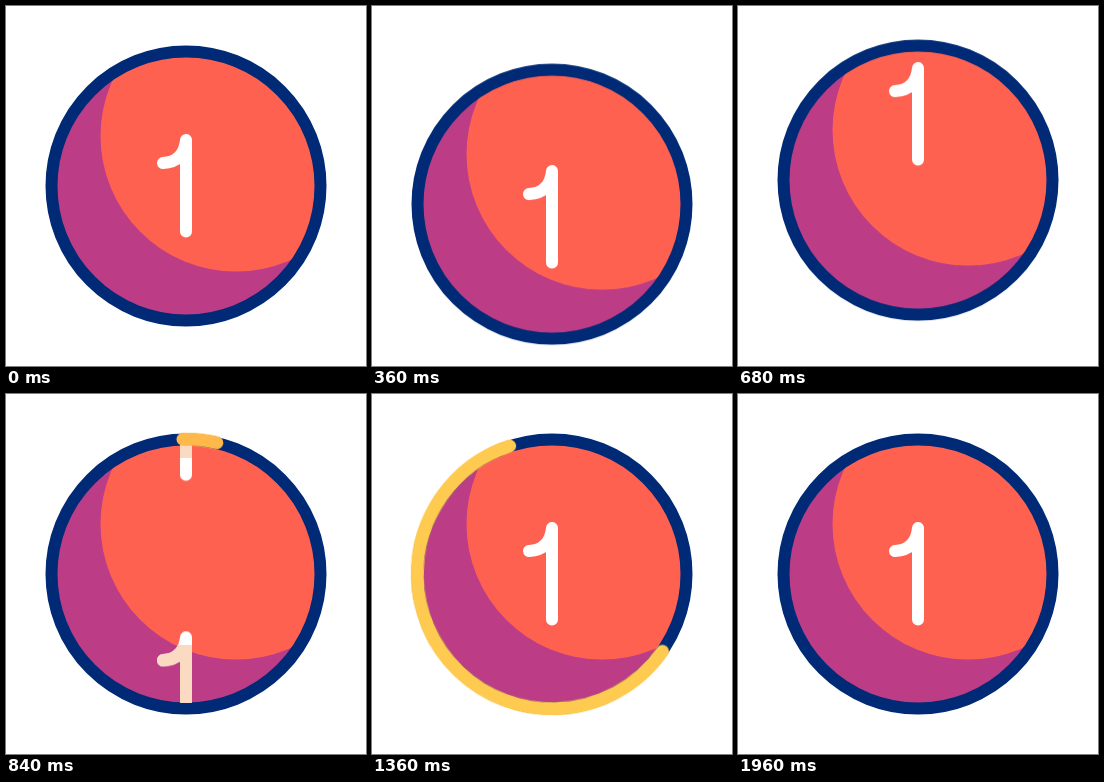
Write an HTML page that moves like this. It is 360x360 px and loops after 2 s.

```html
<!DOCTYPE html>
<html lang="en">
<head>
<meta charset="utf-8">
<title>Bouncing number badge</title>
<style>
  @property --head { syntax: "<length>"; inherits: false; initial-value: 0px; }
  @property --tail { syntax: "<length>"; inherits: false; initial-value: 0px; }

  html, body { margin: 0; width: 100%; height: 100%; overflow: hidden; background: #fff; }
  svg { display: block; width: 100%; height: 100%; }

  /* Sine ease in and out, unless a keyframe sets its own curve */
  .ball, .digit, .sweep, .tint { animation: 2s cubic-bezier(.364, 0, .636, 1) infinite; }
  .ball { animation-name: bounce; }
  .digit {
    animation-name: roll;
    fill: none;
    stroke: #fff;
    stroke-width: 12;
    stroke-linecap: round;
    stroke-linejoin: round;
  }
  .tint { animation-name: flash; }
  .tint .digit { stroke: #fbdac2; }

  /* Arc runs from tail to head, in degrees clockwise from the top */
  .sweep {
    animation-name: head, tail, show;
    fill: none;
    stroke-width: 13;
    stroke-linecap: round;
    stroke-dasharray: calc(var(--head) - var(--tail)) 999px;
    stroke-dashoffset: calc(var(--tail) * -1);
  }

  @keyframes bounce {
    0%, 6% { transform: translateY(0); }
    16.6% { transform: translateY(19.5px); }
    28.6% { transform: translateY(-17.5px); }
    37.6%, 100% { transform: translateY(0); }
  }
  /* The digit leaves at the top while its copy, 254px below, takes its place */
  @keyframes roll {
    0%, 6% { transform: translateY(0); }
    17% { transform: translateY(32.5px); animation-timing-function: cubic-bezier(.333, 0, .667, .648); }
    26% { transform: translateY(-27.2px); animation-timing-function: cubic-bezier(.333, .32, .667, .361); }
    42% { transform: translateY(-144px); animation-timing-function: cubic-bezier(.333, .414, .667, 1); }
    54.5% { transform: translateY(-285px); }
    66.5%, 100% { transform: translateY(-254px); }
  }
  @keyframes head {
    0%, 37.5% { --head: 0px; }
    73%, 100% { --head: 360px; }
  }
  @keyframes tail {
    0%, 51.5% { --tail: 0px; }
    92.5%, 100% { --tail: 360px; }
  }
  @keyframes show {
    0%, 37.9% { visibility: hidden; stroke: #ffb84a; }
    38%, 43.9% { visibility: visible; stroke: #ffb84a; }
    44%, 92.2% { visibility: visible; stroke: #ffca50; }
    92.3%, 100% { visibility: hidden; stroke: #ffca50; }
  }
  @keyframes flash {
    0%, 38.9% { visibility: hidden; }
    39%, 45.9% { visibility: visible; }
    46%, 100% { visibility: hidden; }
  }
</style>
</head>
<body>
<svg viewBox="0 0 360 360">
  <defs>
    <clipPath id="disc"><circle cx="180" cy="180" r="129"/></clipPath>
    <clipPath id="ends"><path d="M0 0H360V64H0ZM0 251H360V360H0Z"/></clipPath>
    <path id="one" d="M157 157Q178 156 180 134V225.5"/>
    <g id="pair"><use href="#one"/><use href="#one" y="254"/></g>
  </defs>

  <g class="ball">
    <circle cx="180" cy="180" r="134" fill="#bc3c86"/>
    <circle cx="230" cy="130" r="135.5" fill="#ff6151" clip-path="url(#disc)"/>
    <circle cx="180" cy="180" r="134.5" fill="none" stroke="#002a76" stroke-width="12"/>
  </g>

  <g clip-path="url(#disc)">
    <use class="digit" href="#pair"/>
    <g class="tint" clip-path="url(#ends)"><use class="digit" href="#pair"/></g>
  </g>

  <circle class="sweep" cx="180" cy="180" r="134.8" pathLength="360" transform="rotate(-91.3 180 180)"/>
</svg>
</body>
</html>
```
